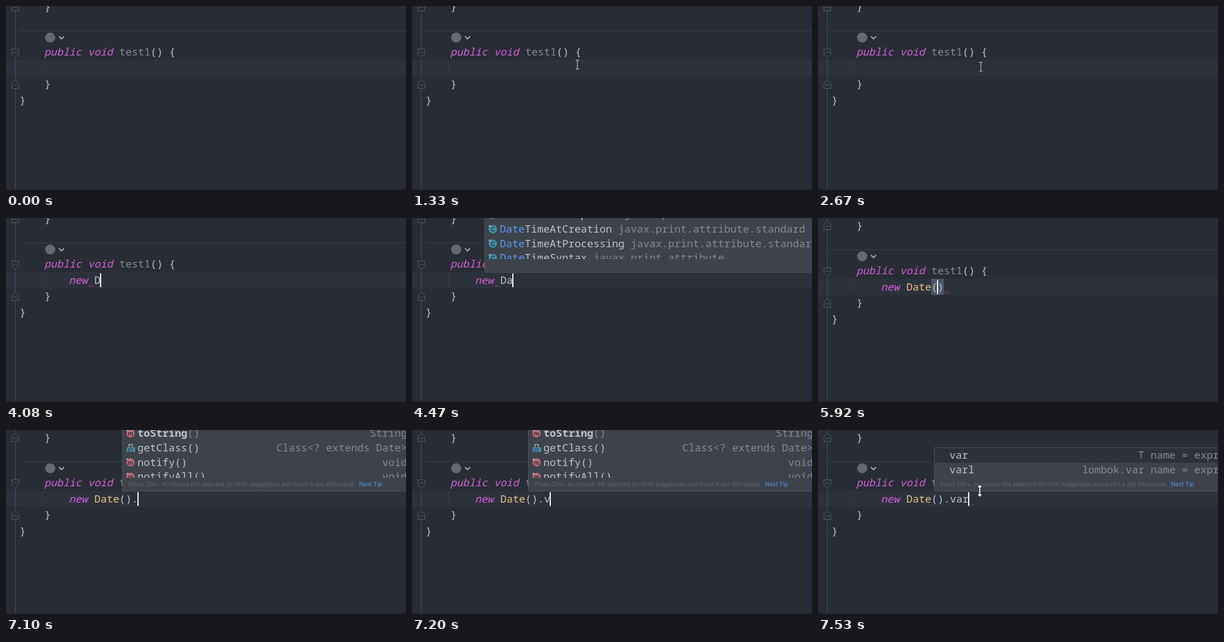
These frames come from a looping animation (706x327 px, 8000 ms). An HTML page with a canvas:

```html
<!DOCTYPE html>
<html lang="en">
<head>
<meta charset="utf-8">
<title>Code completion</title>
<style>
html, body { margin: 0; width: 100%; height: 100%; overflow: hidden; background: #282c34; }
canvas { display: block; }
</style>
</head>
<body>
<canvas id="stage" width="706" height="327"></canvas>
<script>
const ctx = document.getElementById('stage').getContext('2d');
const LOOP = 8000, CH = 11, CODE_X = 112;
const MONO = '18.333px "Noto Sans Mono", monospace';
const ITALIC = 'italic 500 ' + MONO;
const SMALL = '10.2px Inter, sans-serif';
const C = {
  bg: '#282c34', line: '#2c313c', popup: '#3d424b', edge: '#50555e', rule: '#3b4048',
  fold: '#5a5f67', text: '#c0c4cb', dim: '#868b94', hint: '#626771', link: '#5a9cf0',
  keyword: '#d55fde', type: '#e8c27c', error: '#d04650', brace: '#4a566a'
};

function rect(x, y, w, h, color) {
  ctx.fillStyle = color;
  ctx.fillRect(x, y, w, h);
}

function text(str, x, y, color = C.text, font = MONO) {
  ctx.font = font;
  ctx.fillStyle = color;
  ctx.fillText(str, x, y);
}

function path(points, color, width = 1, closed = false) {
  ctx.beginPath();
  points.forEach(([x, y]) => ctx.lineTo(x, y));
  if (closed) ctx.closePath();
  ctx.strokeStyle = color;
  ctx.lineWidth = width;
  ctx.stroke();
}

function disc(x, y, r, color) {
  ctx.beginPath();
  ctx.arc(x, y, r, 0, 2 * Math.PI);
  ctx.fillStyle = color;
  ctx.fill();
}

// dir is 1 for a marker pointing down, -1 for one pointing up
function foldMark(y, dir) {
  const flat = y - 7 * dir, neck = y + 2 * dir, tip = y + 8 * dir;
  path([[10.5, flat], [22.5, flat], [22.5, neck], [16.5, tip], [10.5, neck]], C.fold, 1, true);
  ctx.fillStyle = C.bg;
  ctx.fill();
  ctx.stroke();
  path([[13, y - dir], [20, y - dir]], C.fold);
}

function squiggle(x, y, color = C.error) {
  const points = [];
  for (let i = 0; i <= 20; i++) points.push([x + i / 2, y - 1.2 * Math.sin(i / 2 * Math.PI / 2.5)]);
  path(points, color);
}

function editor(dy) {
  rect(0, 0, 706, 327, C.bg);
  rect(0, 96 + dy, 706, 29, C.line);
  rect(64, 96 + dy, 1, 29, '#363c46');
  rect(24, 44 + dy, 682, 1, C.rule);
  rect(16, 0, 1, 327, '#4b5058');
  foldMark(1.5 + dy, -1);
  foldMark(83.5 + dy, 1);
  foldMark(139.5 + dy, -1);
  disc(78, 56 + dy, 9, '#67696c');
  path([[93.5, 54 + dy], [98, 58.5 + dy], [102.5, 54 + dy]], '#b0b4ba', 1.8);
  text('}', 68, 8 + dy);
  text('public void', 67.5, 88 + dy, C.keyword, ITALIC);
  text('test1', 200, 88 + dy, C.dim);
  text('() {', 255, 88 + dy);
  text('}', 68, 145 + dy);
  text('}', 24, 174 + dy);
  rect(0, 326, 706, 1, '#211f27');
}

// Each entry: start time, typed text, caret column (-1 hides it)
const TYPING = [
  [0, '', -1], [1680, '', 0], [2670, '', -1], [2800, 'ne', 2], [3010, 'new ', 4],
  [4020, 'new D', 5], [4415, 'new Da', 6], [4545, 'new Dat', 7], [4610, 'new Date', 8],
  [5380, 'new Date', -1], [5460, 'new Date()', 9], [6370, 'new Date()', 10],
  [7100, 'new Date().', 11], [7200, 'new Date().v', 12], [7250, 'new Date().va', 13],
  [7530, 'new Date().var', 14]
];

function codeLine(t, dy) {
  const [, typed, caret] = TYPING.findLast(([start]) => t >= start);
  const y = 117 + dy;
  if (t >= 5510 && t < 7100) rect(200, 96 + dy, 22, 29, C.brace);
  if (typed.length < 4) {
    text(typed, CODE_X, y);
  } else {
    text('new', CODE_X - 1, y, C.keyword, ITALIC);
    text(typed.slice(4, 8), CODE_X + 4 * CH, y, t >= 5850 ? C.type : C.text);
    text(typed.slice(8), CODE_X + 8 * CH, y);
  }
  if (t >= 3360 && t < 5850) squiggle(145, 120.7 + dy);
  if (t >= 5920 && t < 7100) squiggle(222, 120.7 + dy);
  if (t >= 7530) squiggle(266, 120.7 + dy, '#8d4c48');
  if (caret >= 0) rect(CODE_X - 1 + caret * CH, 98.5 + dy, 2, 24.5, '#fff');
}

function popup(x, top, bottom, drawRows, hint, linkX) {
  rect(x, top, 706 - x, bottom - top, C.popup);
  ctx.save();
  ctx.beginPath();
  ctx.rect(x, top, 706 - x, bottom - 24 - top);
  ctx.clip();
  drawRows();
  ctx.restore();
  if (hint) {
    text(hint, x + 11, bottom - 9, C.hint, SMALL);
    text('Next Tip', linkX, bottom - 9, C.link, SMALL);
  }
  path([[706, top + .5], [x + .5, top + .5], [x + .5, bottom - .5], [706, bottom - .5]], C.edge);
}

function badge(x, y, letter, color) {
  disc(x, y, 7.3, color);
  ctx.textAlign = 'center';
  text(letter, x, y + 4, '#2c3038', '600 11px Inter, sans-serif');
  ctx.textAlign = 'left';
  disc(x - 5.5, y - 5.5, 2, '#979da6');
}

function classPopup(t) {
  const standard = 'javax.print.attribute.standard';
  const rows = [
    ['TimeAtCompleted', standard], ['TimeAtCreation', standard],
    ['TimeAtProcessing', standard], ['TimeSyntax', 'javax.print.attribute']
  ];
  const hint = t >= 4830 && 'Press Enter to insert, Tab to replace';
  popup(128, -30, 97, () => rows.forEach(([name, pack], i) => {
    const y = -5.8 + i * 25.7;
    badge(142.7, y, 'C', '#3f93ad');
    text('Date', 155, y + 6, C.link);
    text(name, 155 + 4 * CH, y + 6);
    text(pack, 155 + (name.length + 5) * CH, y + 6, C.dim);
  }), hint, 319);
}

const DOT_HINT = 'Press Ctrl+. to choose the selected (or first) suggestion and insert a dot afterwards';

function rightText(str, y) {
  text(str, 708 - str.length * CH, y, C.dim);
}

function methodPopup() {
  const rows = [['toString', 'String'], ['getClass', 'Class<? extends Date>'], ['notify', 'void'], ['notifyAll', 'void']];
  popup(205, -30, 109, () => rows.forEach(([name, type], i) => {
    const y = 6 + i * 25.8;
    if (i === 1) {
      rect(213, y - 1, 15, 8, '#4793b4');
      path([[217, y - 1], [217, y - 6], [223, y - 6], [223, y - 1]], '#aab0b8', 1.5);
      text('OT', 215, y + 6, '#2c3038', 'bold 7px Inter, sans-serif');
    } else {
      badge(220, y, 'm', '#bd6873');
    }
    text(name, 232, y + 6, C.text, (i ? '' : 'bold ') + MONO);
    text('()', 232 + name.length * CH, y + 6, i ? C.text : C.dim);
    rightText(type, y + 6);
  }), DOT_HINT, 623);
}

function templatePopup(rows) {
  const top = 83 - rows.length * 26;
  popup(205, top, 109, () => rows.forEach(([name, result], i) => {
    const y = top + 14 + i * 26;
    if (!i) rect(205, y - 13, 501, 26, '#2c313a');
    text(name, 232, y + 6);
    rightText(result, y + 6);
  }), DOT_HINT, 623);
}

function textCursor(x, y) {
  const shape = [
    [[x - 3, y - 8], [x - 1, y - 8], [x, y - 7], [x + 1, y - 8], [x + 3, y - 8]],
    [[x - 3, y + 8], [x - 1, y + 8], [x, y + 7], [x + 1, y + 8], [x + 3, y + 8]],
    [[x, y - 7], [x, y + 7]]
  ];
  shape.forEach(p => path(p, '#15171b', 2.4));
  shape.forEach(p => path(p, '#e8e8e8', 1.1));
}

function resizeCursor(x, y) {
  const arrows = [
    [x, y - 11], [x + 4, y - 6], [x + 1, y - 6], [x + 1, y + 6], [x + 4, y + 6],
    [x, y + 11], [x - 4, y + 6], [x - 1, y + 6], [x - 1, y - 6], [x - 4, y - 6]
  ];
  path(arrows, '#15171b', 1.5, true);
  ctx.fillStyle = '#fff';
  ctx.fill();
}

function pointer(t) {
  const along = (from, to, p) => from + (to - from) * p;
  if (t >= 7530) return resizeCursor(285.5, 108);
  if (t < 200 || t >= 2800) return;
  if (t < 1330) {
    const p = Math.min(1, Math.floor((t - 200) / 67) / 10);
    const eased = 1 - (1 - p) ** 2;
    return textCursor(along(643.5, 293.5, eased), along(322.5, 103.5, eased));
  }
  if (t < 1610) {
    const p = Math.min(1, (Math.floor((t - 1330) / 70) + 1) / 3);
    return textCursor(along(293.5, 288.5, p), along(103.5, 105.5, p));
  }
  const p = Math.min(1, (Math.floor((t - 1610) / 70) + 1) / 3);
  textCursor(along(288.5, 287.5, p), along(105.5, 108, p));
}

function draw(t) {
  const dy = t >= 5510 ? 12 : 0;
  editor(dy);
  codeLine(t, dy);
  const templates = [['var', 'T name = expr'], ['varl', 'lombok.var name = expr']];
  if (t >= 4350 && t < 5460) classPopup(t);
  else if (t >= 7530) templatePopup(templates);
  else if (t >= 7320) templatePopup([...templates, ['val', 'lombok.val name = expr']]);
  else if (t >= 7100) methodPopup();
  pointer(t);
}

const began = performance.now();
function tick() {
  draw((performance.now() - began) % LOOP);
  requestAnimationFrame(tick);
}
tick();
</script>
</body>
</html>
```
